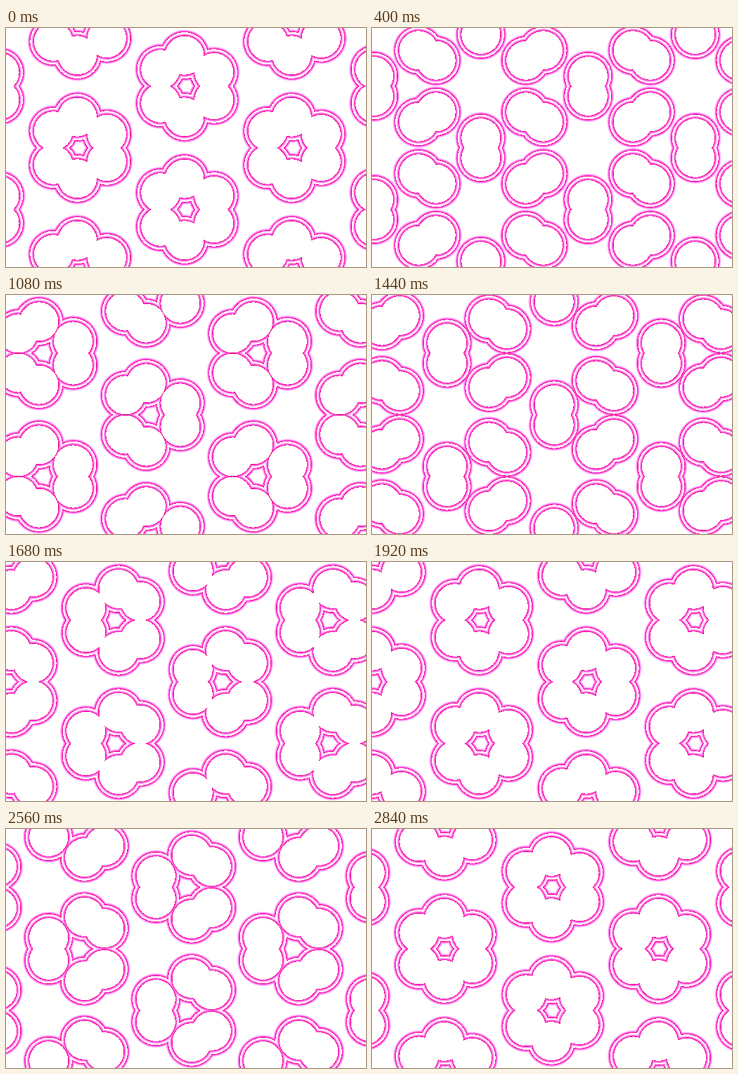
An HTML page with a canvas for the animation above (2.88 s loop, 512 by 341 pixels).

```html
<!DOCTYPE html>
<html lang="en">
<head>
<meta charset="utf-8">
<title>Blossoming circles</title>
<style>
  html, body { margin: 0; width: 100%; height: 100%; overflow: hidden; background: #fff; }
  canvas { display: block; width: 512px; height: 341px; }
</style>
</head>
<body>
<canvas width="512" height="341"></canvas>
<script>
const W = 512, H = 341;
const STEP = 40, STEPS = 72;
const SIDE = 101.6, ROW = SIDE * Math.sqrt(3) / 2, INRADIUS = ROW / 3;
const ORIGIN_X = 256, ORIGIN_Y = 82.5;
const ORBIT = 15;
const INNER = 27.5, BAND = 5.5, REACH = INNER + 2 * BAND;
const RAD = Math.PI / 180;

const ctx = document.querySelector('canvas').getContext('2d');
const image = ctx.createImageData(W, H);
const pixels = new Uint32Array(image.data.buffer);
const field = new Float32Array(W * H);

// Two bands around each circle, each with a hard inner edge fading outwards to white.
function bandColor(d) {
  if (d < INNER || d >= REACH) return 0xffffffff;
  const u = (d - INNER) / BAND % 1;
  const red = Math.min(255, 240 + 80 * u);
  const green = Math.min(255, 345 * u);
  const blue = Math.min(255, 140 + 280 * u);
  return (255 << 24 | blue << 16 | green << 8 | red) >>> 0;
}
const SHADES = 10;
const palette = Uint32Array.from({ length: REACH * SHADES + 1 }, (_, i) => bandColor(i / SHADES));

// Keep the distance to the nearest dot for every pixel.
function addDot(cx, cy) {
  const x0 = Math.max(0, Math.ceil(cx - REACH)), x1 = Math.min(W - 1, cx + REACH);
  const y0 = Math.max(0, Math.ceil(cy - REACH)), y1 = Math.min(H - 1, cy + REACH);
  for (let y = y0; y <= y1; y++) {
    for (let x = x0; x <= x1; x++) {
      const d = Math.hypot(x - cx, y - cy), i = y * W + x;
      if (d < field[i]) field[i] = d;
    }
  }
}

// One dot orbits in each triangle of the lattice; neighbours mirror each other.
function draw(step) {
  field.fill(REACH);
  for (let j = -3; j <= 5; j++) {
    for (let i = -7; i <= 6; i++) {
      const phase = (i + 2 * j) % 3;
      const angle = (220 + step * 360 / STEPS - 120 * phase) * RAD;
      const x = ORIGIN_X + (i + j / 2 + 0.5) * SIDE + ORBIT * Math.cos(angle);
      const y = ORIGIN_Y + j * ROW;
      const dy = INRADIUS + ORBIT * Math.sin(angle);
      addDot(x, y + dy);
      addDot(x, y - dy);
    }
  }
  for (let i = 0; i < field.length; i++) pixels[i] = palette[field[i] * SHADES | 0];
  ctx.putImageData(image, 0, 0);
}

let shown = -1;
function tick() {
  const step = Math.floor(performance.now() / STEP) % STEPS;
  if (step !== shown) draw(shown = step);
  requestAnimationFrame(tick);
}
tick();
</script>
</body>
</html>
```
